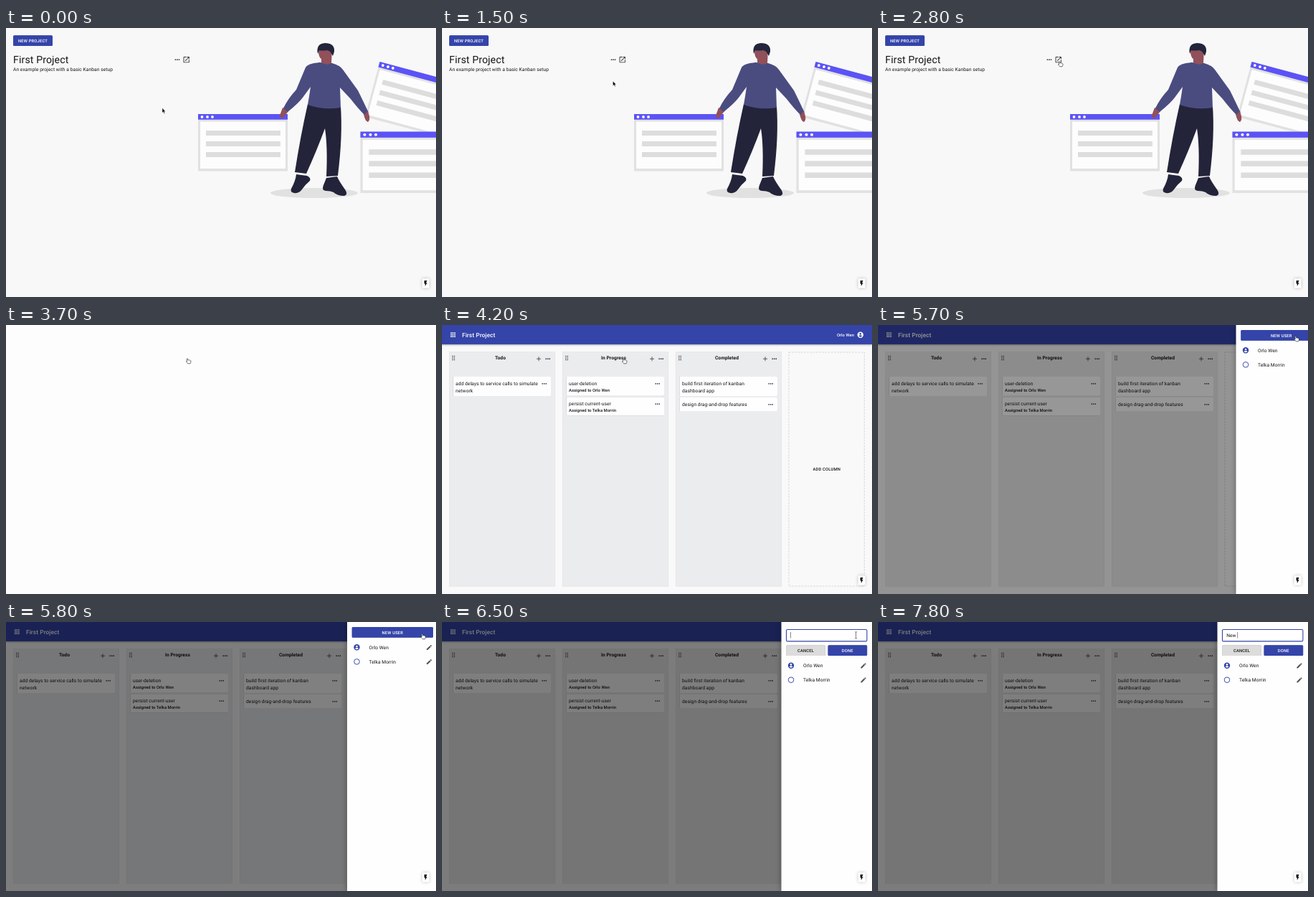
Animation of 600 by 375 pixels, one loop 8000 ms. Source, as an HTML page:

```html
<!DOCTYPE html>
<html lang="en">
<head>
<meta charset="utf-8">
<title>Kanban demo</title>
<style>
  html, body { margin: 0; width: 100%; height: 100%; overflow: hidden; background: #fdfdfd; }
  svg { display: block; width: 100vw; height: 100vh; }
  text { font: 6.67px Roboto, sans-serif; letter-spacing: .00938em; fill: #161616;
         text-rendering: geometricPrecision; white-space: pre; }
  .button { font-size: 5.83px; font-weight: 500; letter-spacing: .02857em; text-anchor: middle; }
  .small { font-size: 5.83px; font-weight: 500; letter-spacing: .00714em; }
  .heading { font-weight: 700; text-anchor: middle; }
  .light { fill: #fff; }
  .raised { filter: drop-shadow(0 .5px .6px rgba(0, 0, 0, .4)); }
</style>
</head>
<body>
<svg id="stage" viewBox="0 0 600 375"></svg>
<script>
const BLUE = '#3444a9', VIOLET = '#5b53f6', NAVY = '#23243a', SKIN = '#91505a';
const USERS = ['Orlo Wen', 'Telka Morrin'];
const EDIT = 'M3 17.25V21h3.75L17.81 9.94l-3.75-3.75zM20.71 7.04c.39-.39.39-1.02 0-1.41l-2.34-2.34c-.39-.39-1.02-.39-1.41 0l-1.83 1.83 3.75 3.75z';
const OPEN = 'M19 19H5V5h7V3H5c-1.1 0-2 .9-2 2v14c0 1.1.9 2 2 2h14c1.1 0 2-.9 2-2v-7h-2zM14 3v2h3.6l-9.8 9.8 1.4 1.4L19 6.4V10h2V3z';
const BOLT = 'M7 2v11h3v9l7-12h-4l4-8z';

// Markup helpers
const rect = (x, y, w, h, fill, extra = '') =>
  `<rect x="${x}" y="${y}" width="${w}" height="${h}" fill="${fill}" ${extra}/>`;
const text = (x, y, s, cls = '') => `<text x="${x}" y="${y}" class="${cls}">${s}</text>`;
const path = (d, fill, extra = '') => `<path d="${d}" fill="${fill}" ${extra}/>`;
const circle = (x, y, r, fill) => `<circle cx="${x}" cy="${y}" r="${r}" fill="${fill}"/>`;
const group = (id, body, extra = '') => `<g id="${id}" ${extra}>${body}</g>`;
const icon = (d, x, y, scale, fill) =>
  path(d, fill, `transform="translate(${x} ${y}) scale(${scale}) translate(-12 -12)"`);
const grid = (x, y, xs, ys, draw) =>
  ys.map(dy => xs.map(dx => draw(x + dx, y + dy)).join('')).join('');
const more = (x, y) => grid(x, y, [-2.5, 0, 2.5], [0], (a, b) => circle(a, b, .85, '#333'));
const person = (x, y, fill, cut) => circle(x, y, 4.2, fill) + circle(x, y - 1.35, 1.3, cut) +
  path(`M${x - 2.5} ${y + 1.6}Q${x} ${y - .6} ${x + 2.5} ${y + 1.6}Q${x} ${y + 4.4} ${x - 2.5} ${y + 1.6}`, cut);

function browserWindow(transform) {
  const dots = [5.5, 13, 20].map(x => circle(x, 3.9, 1.9, '#fff')).join('');
  const bars = [23, 38, 53].map(y => rect(11, y, 104, 7, '#dddddd')).join('');
  return `<g transform="${transform}">${rect(0, 0, 125, 79.5, '#e1e1e1')}${rect(3, 10.5, 119, 65.5, '#fdfdfd')}
    ${rect(0, 0, 125, 7.7, VIOLET)}${dots}${bars}</g>`;
}

function man() {
  return `<ellipse cx="430" cy="230" rx="61" ry="7" fill="#e1e1e1"/>` +
    path('M386 111L382 122Q382 127 387 125L394 116ZM499 120Q501 130 505 131Q508 129 507 123L505 115Z', SKIN) +
    path('M421 106Q443 114 467 109Q470 150 463 206L447 207Q449 165 445 140Q434 170 419 203L403 201Q411 150 421 106', NAVY) +
    path('M405 204L420 206Q426 209 424 213Q418 218 413 225Q409 231 402 230Q396 229 398 224Q404 213 405 204', NAVY) +
    path('M447 209L462 207Q465 214 473 225Q478 232 472 234Q462 234 457 229Q453 227 446 227Q440 226 443 219Z', NAVY) +
    path('M437 48C430 49 421 50 418 55L405 86Q393 99 387 112L393 117Q408 105 414 97L425 82Q423 96 421 107Q443 115 467 111L466 83L481 99Q491 112 500 121L505 116Q497 99 491 87L470 58Q466 52 455 49Z', '#4a4c80') +
    path('M436 31L454 31Q455 40 454 49Q447 53 440 48V43Q436 41 436 31', SKIN) +
    path('M435 36Q432 22 445 21Q459 21 458 33L456 39L454 36Q453 32 448 31Q440 32 437 31Z', '#22253b');
}

function home() {
  return rect(0, 0, 600, 375, '#f8f8f8') +
    rect(10, 10.3, 55, 14.8, BLUE, 'rx="1.7" class="raised"') +
    text(37.5, 19.8, 'NEW PROJECT', 'button light') +
    `<text x="10" y="49.3" style="font-size:14.17px;letter-spacing:.00735em">First Project</text>` +
    text(10, 60, 'An example project with a basic Kanban setup') +
    more(239, 44.2) + icon(OPEN, 251.7, 44.2, .46, '#333') +
    browserWindow('translate(268 120)') +
    browserWindow('translate(521.5 47) rotate(15)') +
    browserWindow('translate(494.5 144.5) scale(1.075)') + man();
}

function column(x, title, cards) {
  const header = grid(x + 6, 46, [-1.25, 1.25], [-2.5, 0, 2.5], (a, b) => circle(a, b, .8, '#444')) +
    text(x + 71.5, 48, title, 'heading') +
    path(`M${x + 122} 47.2h6M${x + 125} 44.2v6`, 'none', 'stroke="#444" stroke-width=".85"') +
    more(x + 137.7, 47.2);
  const body = cards.map(({ y, h, lines, owner }) =>
    rect(x + 5.5, y, 136.5, h, '#fefefe', 'rx="1" class="raised"') +
    lines.map((line, i) => text(x + 9, y + 11.5 + i * 10, line)).join('') +
    (owner ? text(x + 9, y + 20.8, 'Assigned to ' + owner, 'small') : '') +
    more(x + 132.7, y + 9.8)).join('');
  return rect(x + .2, 37.7, 147.6, 326.5, '#ebecee', 'stroke="#dcdddf" stroke-width=".5"') + header + body;
}

function board() {
  return rect(0, 0, 600, 375, '#f9f9f9') +
    rect(0, 0, 600, 26.9, BLUE, 'style="filter:drop-shadow(0 1px 1.3px rgba(0,0,0,.35))"') +
    grid(15.3, 13.7, [-2.5, 0, 2.5], [-2.5, 0, 2.5], (a, b) => rect(a - .85, b - .85, 1.7, 1.7, '#fff')) +
    `<text x="28" y="16.7" class="light" style="font-size:8.33px;font-weight:500">First Project</text>` +
    `<text x="575" y="15.8" class="small light" text-anchor="end">${USERS[0]}</text>` +
    person(583.8, 13.7, '#fff', BLUE) +
    column(10, 'Todo', [{ y: 72, h: 27, lines: ['add delays to service calls to simulate', 'network'] }]) +
    column(168, 'In Progress', [
      { y: 72, h: 26, lines: ['user-deletion'], owner: USERS[0] },
      { y: 100.3, h: 26, lines: ['persist current-user'], owner: USERS[1] }]) +
    column(326, 'Completed', [
      { y: 72, h: 27, lines: ['build first iteration of kanban', 'dashboard app'] },
      { y: 101, h: 19, lines: ['design drag-and-drop features'] }]) +
    rect(484, 38, 105.3, 326, 'none', 'stroke="#d2d2d2" stroke-width=".9" stroke-dasharray="2.6 1.6"') +
    text(536.7, 203, 'ADD COLUMN', 'button');
}

function drawer() {
  const rows = person(13.5, 35.3, BLUE, '#fefefe') +
    `<circle cx="13.5" cy="55.3" r="3.8" fill="none" stroke="${BLUE}" stroke-width=".95"/>` +
    USERS.map((name, i) => text(30.5, 37.6 + 20 * i, name) + icon(EDIT, 114.5, 35.5 + 20 * i, .4, '#555')).join('');
  const button = rect(6.7, 7, 113.3, 14.8, BLUE, 'rx="1.5" class="raised"') +
    text(63.3, 16.5, 'NEW USER', 'button light');
  const form = rect(7, 10.5, 112.4, 16.4, '#fff', `rx="1.5" stroke="${BLUE}" stroke-width="1.1"`) +
    `<text id="typed" x="12.7" y="20.8"></text>` +
    rect(0, 14, .5, 8.4, '#111', 'id="caret"') +
    rect(6.7, 32.2, 54.5, 14.8, '#dcdcdc', 'rx="1.5" class="raised"') + text(34, 41.7, 'CANCEL', 'button') +
    rect(65, 32.2, 54.7, 14.8, BLUE, 'rx="1.5" class="raised"') + text(92.3, 41.7, 'DONE', 'button light');
  return rect(0, 0, 127, 375, '#fefefe', 'style="filter:drop-shadow(-1px 0 3px rgba(0,0,0,.3))"') +
    group('button', button) + group('form', form) + group('rows', rows);
}

const pointers =
  group('arrow', path('M0 0V6.8L1.6 5.4L2.7 7.9L3.8 7.4L2.7 5H4.7Z', '#000', 'stroke="#fff" stroke-width=".5"')) +
  group('hand', path('M-.7 .2Q0 -.9 .7 .2L1.3 2Q2.2 1.4 2.7 2.1Q3.7 1.7 4.1 2.5Q5 2.5 5 3.6Q5 5.5 4 6.8H.8Q-.3 5.4 -1.5 4.2Q-1.8 3.2 -.2 3.5Z',
    '#fff', 'stroke="#222" stroke-width=".65" stroke-linejoin="round"')) +
  group('beam', path('M-1.3 -3.5Q0 -3.5 0 -2.7Q0 -3.5 1.3 -3.5M0 -2.7V5.3M-1.3 6.1Q0 6.1 0 5.3Q0 6.1 1.3 6.1', 'none', 'stroke="#222" stroke-width=".6"'));

document.getElementById('stage').innerHTML =
  group('home', home()) + group('board', board()) +
  rect(0, 0, 600, 375, '#000', 'id="shade"') + group('drawer', drawer()) +
  group('bolt', rect(580.8, 349.3, 9.8, 13.3, '#fff', 'rx="1.5" style="filter:drop-shadow(0 .5px 2px rgba(0,0,0,.25))"') +
    icon(BOLT, 585.6, 356, .4, '#111')) +
  group('pointer', pointers);

const el = id => document.getElementById(id);
const show = (id, visible) => { el(id).style.display = visible ? '' : 'none'; };
const clamp = v => Math.max(0, Math.min(1, v));
const smooth = v => v * v * (3 - 2 * v);

// Cubic Bézier easing with control points (x1, y1) and (x2, 1)
function bezier(x1, y1, x2, v) {
  const at = (a, b, s) => 3 * (1 - s) ** 2 * s * a + 3 * (1 - s) * s * s * b + s ** 3;
  let lo = 0, hi = 1;
  for (let i = 0; i < 24; i++) {
    const mid = (lo + hi) / 2;
    if (at(x1, x2, mid) < v) lo = mid; else hi = mid;
  }
  return at(y1, 1, lo);
}

// Pointer stops: time, x, y
const STOPS = [[0, 218, 111.5], [2700, 253, 47], [4500, 253, 47], [5400, 584, 14], [5600, 584.5, 15.3],
  [5800, 580.5, 17], [6400, 580.5, 17], [6800, 562, 18], [7000, 562, 18], [7300, 537, 18]];

function pointerAt(t) {
  const next = STOPS.findIndex(stop => stop[0] > t);
  if (next < 0) return STOPS[STOPS.length - 1].slice(1);
  const a = STOPS[next - 1], b = STOPS[next];
  const k = smooth((t - a[0]) / (b[0] - a[0]));
  return [a[1] + (b[1] - a[1]) * k, a[2] + (b[2] - a[2]) * k];
}

function pointerKind(t) {
  if (t >= 7500) return 'none';
  if (t >= 6500) return 'beam';
  const overLink = t >= 2600 && t < 4300 || t >= 5400 && t < 5600 || t >= 5700;
  return overLink ? 'hand' : 'arrow';
}

function draw(t) {
  const loaded = t >= 4200, editing = t >= 6500;
  show('home', t < 3700);
  show('board', loaded);
  show('bolt', t < 3700 || loaded);

  const progress = clamp((t - 5580) / 271);
  show('drawer', progress > 0);
  el('drawer').setAttribute('transform', `translate(${600 - 126.5 * bezier(0, 0, .2, progress)} 0)`);
  el('shade').setAttribute('opacity', .5 * bezier(.4, 0, .2, clamp((t - 5580) / 225)));
  show('shade', progress > 0);

  show('button', !editing);
  show('form', editing);
  el('rows').setAttribute('transform', `translate(0 ${editing ? 25.4 : 0})`);
  el('typed').textContent = 'New '.slice(0, Math.max(0, Math.floor((t - 7400) / 100)));
  el('caret').setAttribute('x', 12.9 + (editing ? el('typed').getComputedTextLength() : 0));
  show('caret', t < 7100 || t >= 7500);

  const kind = pointerKind(t);
  for (const id of ['arrow', 'hand', 'beam']) show(id, id === kind);
  el('pointer').setAttribute('transform', `translate(${pointerAt(t)})`);
}

// The picture advances ten times a second
function tick() {
  draw(Math.floor(performance.now() % 8000 / 100) * 100);
  requestAnimationFrame(tick);
}
tick();
</script>
</body>
</html>
```
